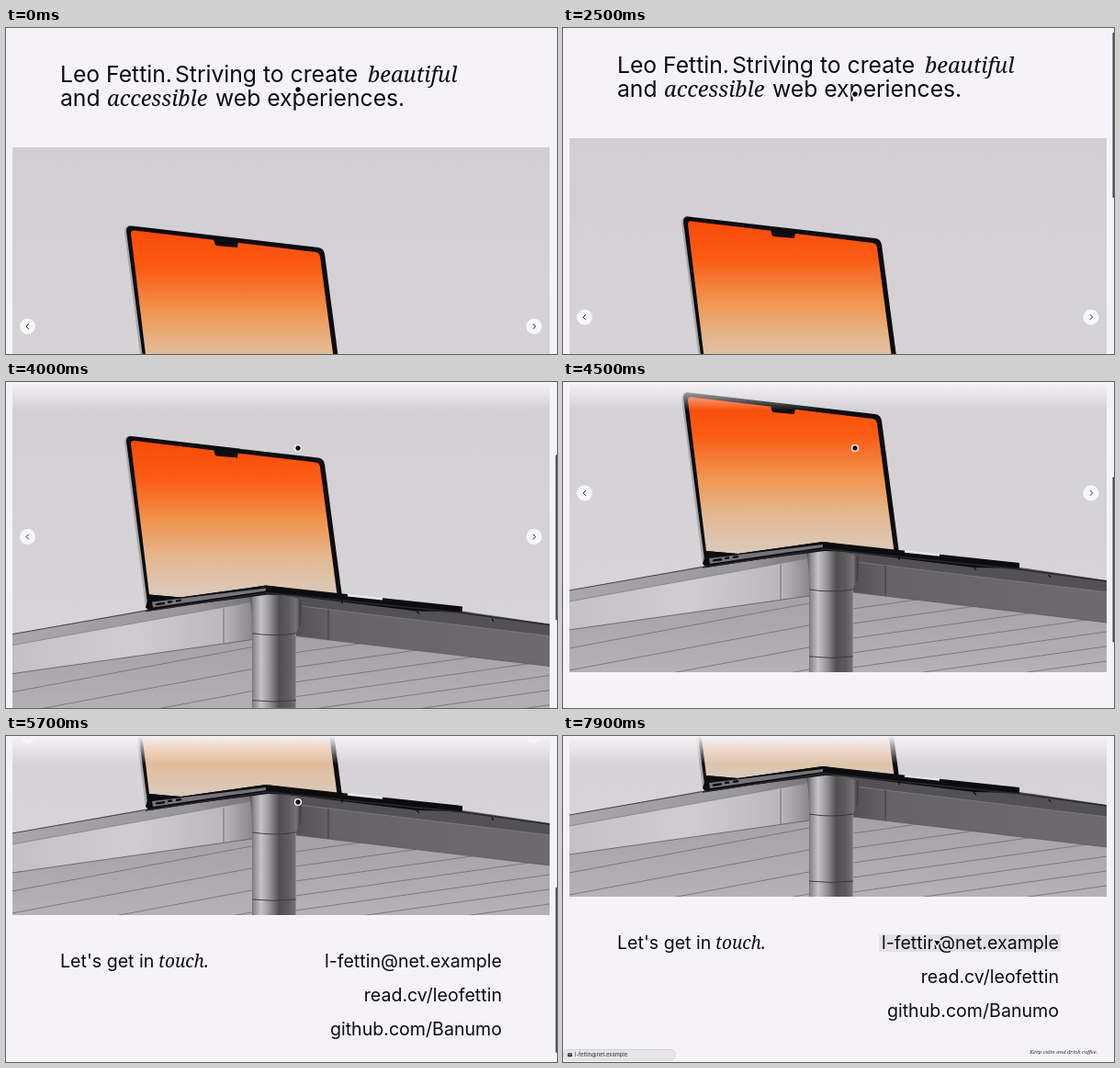
An HTML page for the animation above (8000 ms loop, 600x355 px).

```html
<!DOCTYPE html>
<html lang="en">
<head>
<meta charset="utf-8">
<title>Portfolio</title>
<style>
html, body { margin: 0; width: 100%; height: 100%; overflow: hidden; background: #f5f3f7; }
svg { display: block; width: 600px; height: 355px; }
text { font: 24.7px Inter, sans-serif; fill: #0d0d0f; }
.it { font: italic 23.6px "Noto Serif", serif; }
.mid { font-size: 19.6px; }
.mid.it { font-size: 19px; }
.tiny { font-size: 5.8px; fill: #333; }
.tiny.it { font-size: 5.8px; }
.end { text-anchor: end; }
</style>
</head>
<body>
<svg viewBox="0 0 600 355">
  <defs>
    <linearGradient id="wall" x2="0" y2="1">
      <stop offset="0" stop-color="#d1cfd1"/><stop offset="1" stop-color="#d8d6d8"/>
    </linearGradient>
    <linearGradient id="glow" gradientUnits="userSpaceOnUse" x1="0" y1="16" x2="0" y2="186">
      <stop offset="0" stop-color="#fb4a08"/><stop offset=".25" stop-color="#fa5c16"/>
      <stop offset=".52" stop-color="#f0954f"/><stop offset=".75" stop-color="#e4b891"/>
      <stop offset="1" stop-color="#dacabd"/>
    </linearGradient>
    <linearGradient id="steel">
      <stop offset="0" stop-color="#4a484c"/><stop offset=".08" stop-color="#8b898d"/>
      <stop offset=".22" stop-color="#c6c4c8"/><stop offset=".38" stop-color="#96949a"/>
      <stop offset=".56" stop-color="#514f53"/><stop offset=".74" stop-color="#5d5b60"/>
      <stop offset=".88" stop-color="#757378"/><stop offset=".96" stop-color="#403e42"/>
      <stop offset="1" stop-color="#555357"/>
    </linearGradient>
    <linearGradient id="left">
      <stop offset="0" stop-color="#c3c1c4"/><stop offset=".5" stop-color="#cfcdd0"/>
      <stop offset=".88" stop-color="#bab8bb"/><stop offset="1" stop-color="#8a888c"/>
    </linearGradient>
    <linearGradient id="leftTop">
      <stop offset="0" stop-color="#a9a7aa"/><stop offset=".7" stop-color="#989699"/><stop offset="1" stop-color="#6c6a6e"/>
    </linearGradient>
    <linearGradient id="right">
      <stop offset="0" stop-color="#525053"/><stop offset=".15" stop-color="#666467"/><stop offset="1" stop-color="#6d6b6e"/>
    </linearGradient>
    <linearGradient id="under" x2="0" y2="1">
      <stop offset="0" stop-color="#a3a1a4"/><stop offset="1" stop-color="#b4b2b5"/>
    </linearGradient>
    <linearGradient id="veil" x2="0" y2="1">
      <stop offset="0" stop-color="#f5f3f7"/><stop offset="1" stop-color="#f5f3f7" stop-opacity="0"/>
    </linearGradient>
    <clipPath id="frame"><path d="M7 -74H592V316H7z"/></clipPath>
    <clipPath id="underClip"><path d="M7 269L268 232L316 229L592 261V316H7z"/></clipPath>
  </defs>

  <g id="page">
    <g id="head">
      <text x="59" y="59">Leo Fettin.</text>
      <text x="184" y="59">Striving to create</text>
      <text x="394" y="59" class="it">beautiful</text>
      <text x="59" y="85">and</text>
      <text x="110" y="85" class="it">accessible</text>
      <text x="228" y="85">web experiences.</text>
    </g>

    <g id="show" transform="translate(0 204)">
      <g clip-path="url(#frame)">
        <g id="track">
          <g id="slide" clip-path="url(#frame)">
            <path fill="url(#wall)" d="M7 -74H592V316H7z"/>
            <!-- underside with slats -->
            <path fill="url(#under)" d="M7 265L268 228H316L592 258V316H7z"/>
            <path id="slats" clip-path="url(#underClip)" stroke="#6f6d71" stroke-width=".8" fill="none"/>
            <!-- table edges -->
            <path fill="url(#leftTop)" d="M7 227L155 200L285 178V194L7 242z"/>
            <path fill="url(#left)" d="M7 239L268 192V233L7 270z"/>
            <path fill="#535154" d="M285 178L497 202L592 216V230L318 197L285 190z"/>
            <path fill="url(#right)" d="M316 196L592 229V262L316 229z"/>
            <path stroke="#454346" fill="none" d="M7 227L155 201"/>
            <path stroke="#828084" stroke-width=".8" fill="none" d="M7 239L268 192M318 196L592 229"/>
            <path stroke="#5c5a5e" stroke-width=".8" fill="none" d="M7 270L268 233M237 199V237M316 229L592 262"/>
            <path stroke="#343235" stroke-width=".8" d="M351 200V233"/>
            <!-- leg -->
            <path fill="url(#steel)" d="M265 186Q291 180 323 190L321 217Q317 221 315.500 228V316H268V228Q268 198 265 186z"/>
            <path stroke="#363538" stroke-width=".9" fill="none" d="M268 226Q292 230 316 226M268 299Q292 302 316 299"/>
            <!-- laptop -->
            <path fill="#a9a7aa" d="M129 18Q129 11 136 11L158 199L152 198z"/>
            <path fill="#0c0c0e" d="M131 17Q131 11 137 11.500L340 35Q346 36 347 42L366 186L285 184L155 201z"/>
            <path fill="url(#glow)" d="M136 20Q136 16 140 16.500L337 40Q341 40.500 342 45L360.500 184L283 174L190 187L156 184z"/>
            <path fill="#0c0c0e" d="M226 25L253 28L252 35L229 33Q227 32 226 25z"/>
            <path fill="#0c0c0e" d="M156 184L191 187L283 174L366 183L497 197V203L447 202L285 182L156 202L152 198z"/>
            <path fill="#767478" d="M159 192L283 177V180L160 198z"/>
            <path stroke="#0c0c0e" stroke-width="2.400" stroke-linecap="round" d="M164 194.500L172 193.400M177 192L180 191.600M186 190.800L190 190.200"/>
            <path stroke="#e8e6e9" stroke-width="2.600" d="M372 184.500L410 188.500"/>
            <path stroke="#29282a" stroke-width="1.500" fill="none" d="M152 202L285 182L497 204L592 217"/>
            <path stroke="#0c0c0e" stroke-width="1.300" d="M366 190V194M447 202L450 205M529 210L531 213"/>
          </g>
          <use href="#slide" x="585"/>
        </g>
      </g>
      <g fill="#f8f7f9"><circle cx="23.500" cy="121" r="8.500"/><circle cx="575" cy="121" r="8.500"/></g>
      <path fill="none" stroke="#222" d="M24.800 118.200L22 121L24.800 123.800M573.800 118.200L576.600 121L573.800 123.800"/>
    </g>

    <rect id="hover" x="344" y="561" width="198" height="19" fill="#e3e1e5"/>
    <text x="59" y="577" class="mid">Let's get in</text>
    <text x="166" y="577" class="mid it">touch.</text>
    <text x="540" y="577" class="mid end">l-fettin@net.example</text>
    <text x="540" y="614" class="mid end">read.cv/leofettin</text>
    <text x="540" y="651" class="mid end">github.com/Banumo</text>
    <text x="17" y="690.500" class="tiny">2023</text>
    <text x="582" y="690.500" class="tiny it end">Keep calm and drink coffee.</text>
  </g>

  <rect width="600" height="31" fill="url(#veil)"/>
  <rect id="bar" x="598.500" width="3" height="180" rx="1" fill="#48474a"/>
  <g id="status">
    <rect x=".5" y="341.500" width="121.500" height="11.500" rx="4.500" fill="#e6e5e7" stroke="#cfced1" stroke-width=".8"/>
    <rect x="5" y="345.200" width="5" height="4" rx=".8" fill="#333"/>
    <path d="M5.300 345.700L7.500 347.500L9.700 345.700" fill="none" stroke="#e6e5e7" stroke-width=".6"/>
    <text x="13" y="349.300" class="tiny">l-fettin@net.example</text>
  </g>
  <g id="cursor" fill="#0b0b0d" stroke="#fff" stroke-width="1.300">
    <circle id="dot" r="3.400"/>
    <path id="arrow" d="M-4 -3.500L4.800 -1.800L.2 4.600z" stroke-linejoin="round"/>
  </g>
</svg>
<script>
const $ = id => document.getElementById(id);
const set = (id, name, value) => $(id).setAttribute(name, value);
const show = (id, on) => set(id, 'opacity', +on);

// value at time t from [time, value] points, straight between them
function at(t, keys) {
  if (t <= keys[0][0]) return keys[0][1];
  for (let i = 1; i < keys.length; i++) {
    const [t0, a] = keys[i - 1], [t1, b] = keys[i];
    if (t < t1) return a + (b - a) * (t - t0) / (t1 - t0);
  }
  return keys[keys.length - 1][1];
}

let slats = '';
for (let y = 241; y < 340; y += 24) slats += `M7 ${y + 49}L268 ${y}`;
for (let y = 247; y < 375; y += 16) slats += `M316 ${y}L592 ${y - 39}`;
set('slats', 'd', slats);

const fade = [[400, 1], [1300, 0], [1700, 0], [2400, 1]];
const scroll = [[2400, 0], [3200, 80], [4500, 204], [5700, 325], [5920, 345]];
const cursorX = [[6100, 318], [6800, 353], [7700, 407]];
const cursorY = [[0, 67], [300, 72], [6100, 72], [6800, 111], [7700, 225]];

function draw(now) {
  const t = now % 8000;
  const y = at(t, scroll);
  const k = at(t, [[6450, 0], [7180, 1]]);
  const slide = Math.round(k * k * (3 - 2 * k) * 585);
  set('page', 'transform', `translate(0 ${-y})`);
  set('track', 'transform', `translate(${-slide} 0)`);
  show('head', at(t, fade));
  show('show', at(t, fade));
  set('bar', 'y', y * 355 / 700);
  show('bar', t >= 2400 && t < 7150);
  set('cursor', 'transform', `translate(${at(t, cursorX)} ${at(t, cursorY)})`);
  show('dot', t < 6200);
  show('arrow', t >= 6200);
  show('hover', t >= 7600);
  show('status', t >= 7800);
  requestAnimationFrame(draw);
}
requestAnimationFrame(draw);
</script>
</body>
</html>
```
